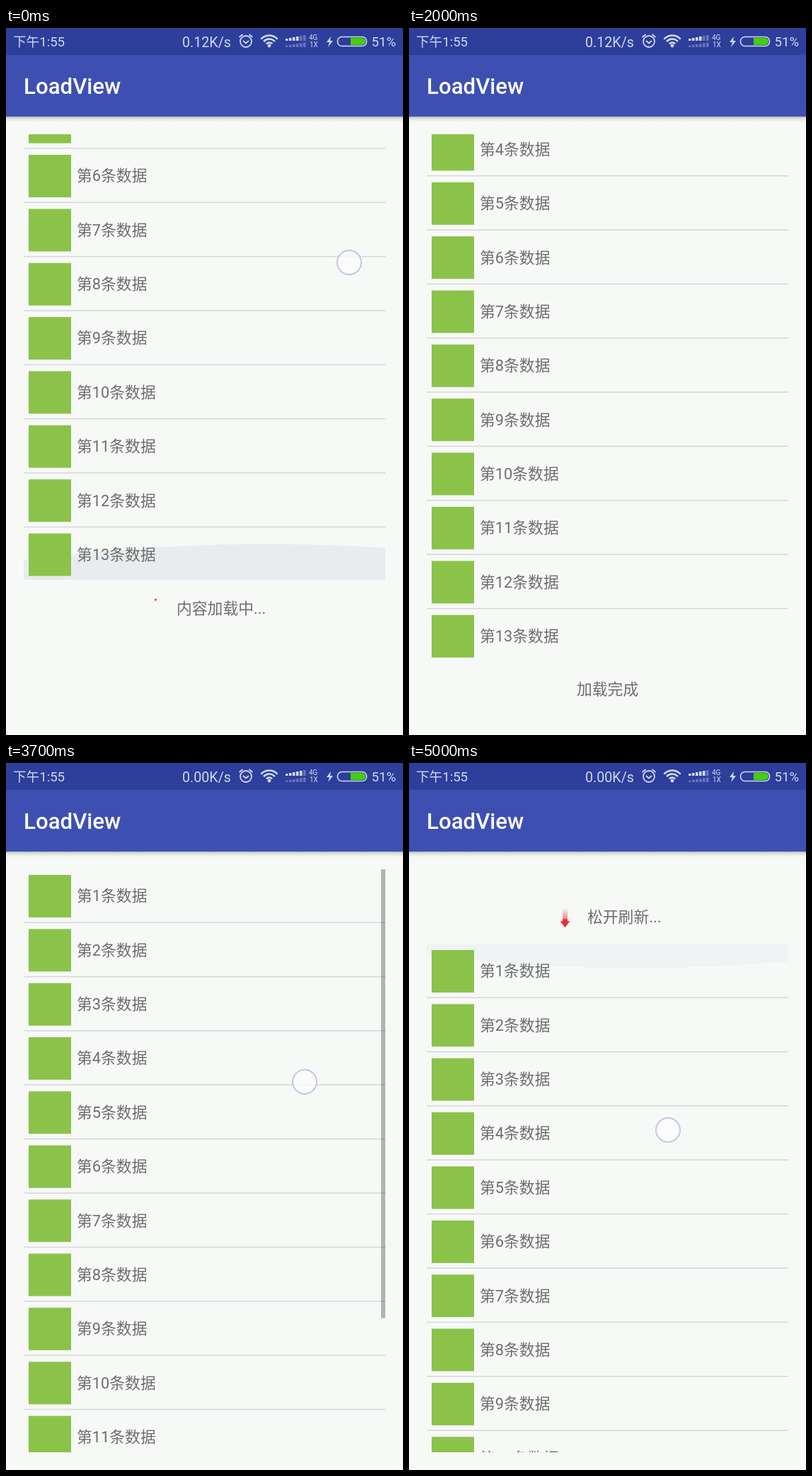
An HTML page with a canvas that plays this animation: 561 px wide and 998 px high, repeating every 5100 ms.

```html
<!DOCTYPE html>
<html lang="zh">
<head>
<meta charset="utf-8">
<title>LoadView</title>
<style>
html, body { margin: 0; width: 100%; height: 100%; overflow: hidden; background: #f7f9f7; }
canvas { display: block; }
</style>
</head>
<body>
<canvas id="stage" width="561" height="998"></canvas>
<script>
const ctx = document.getElementById('stage').getContext('2d');
const LOOP = 5100, STEP = 100;
const LEFT = 25, RIGHT = 536, TOP = 150, BOTTOM = 973, ROW = 76.36, BASELINE = 45.4;
const LOADED = 1700, ROW_ADDED = 2200;
const BG = '#f7f9f7', LIGHT = '#d3d8ee', DIM = '#6674bb', GREY = '#6d6e6d';

const clamp = v => Math.min(1, Math.max(0, v));
const easeOut = (v, power) => 1 - (1 - clamp(v)) ** power;

// Linear interpolation through [time, value] points
function track(t, points) {
  let [t0, v0] = points[0];
  for (const [t1, v1] of points) {
    if (t < t1) return v0 + (v1 - v0) * clamp((t - t0) / (t1 - t0));
    [t0, v0] = [t1, v1];
  }
  return v0;
}

// cubic-bezier(.4, 0, .2, 1)
function standardEase(x) {
  x = clamp(x);
  let lo = 0, hi = 1, s = 0.5;
  for (let i = 0; i < 20; i++) {
    s = (lo + hi) / 2;
    const bx = 1.2 * s * (1 - s) ** 2 + 0.6 * s * s * (1 - s) + s ** 3;
    if (bx < x) lo = s; else hi = s;
  }
  return s * s * (3 - 2 * s);
}

function rect(x, y, w, h, color) {
  ctx.fillStyle = color;
  ctx.fillRect(x, y, w, h);
}

function text(str, x, y, size, color, weight = 400, align = 'left') {
  ctx.font = `${weight} ${size}px Roboto, "Noto Sans CJK SC", "Noto Sans CJK", sans-serif`;
  ctx.textAlign = align;
  ctx.fillStyle = color;
  ctx.fillText(str, x, y);
}

function stroke(path, color, width) {
  ctx.strokeStyle = color;
  ctx.lineWidth = width;
  ctx.stroke(new Path2D(path));
}

function arc(x, y, r, from, to, color, width) {
  ctx.beginPath();
  ctx.arc(x, y, r, from, to);
  ctx.strokeStyle = color;
  ctx.lineWidth = width;
  ctx.stroke();
}

function statusBar(t) {
  rect(0, 0, 561, 38, '#2d3e9b');
  text('下午1:55', 10, 26, 18.6, LIGHT);
  text(t < 2400 ? '0.12K/s' : '0.00K/s', 318, 27, 19.7, LIGHT, 400, 'right');
  text('51%', 551, 26, 18.6, LIGHT, 400, 'right');

  arc(339, 19, 8, 0, 7, LIGHT, 1.8);
  stroke('M329.5 13l5-4M348.5 13l-5-4M335 18l4 3.5 4-3.5', LIGHT, 1.8);

  for (const r of [5.5, 10.5, 15.5]) arc(372, 26, r, -Math.PI * 0.77, -Math.PI * 0.23, LIGHT, 2.6);
  ctx.beginPath();
  ctx.arc(372, 25, 2.4, 0, 7);
  ctx.fillStyle = LIGHT;
  ctx.fill();

  const lit = t < 2400 ? 4 : 5;
  for (let i = 0; i < 6; i++) {
    const h = 3 + i;
    rect(395 + i * 5, 18 - h, 3.6, h, i < lit ? LIGHT : DIM);
    rect(395 + i * 5, 27 - h * 0.8, 3.6, h * 0.8, DIM);
  }
  text('4G', 428, 17, 10, LIGHT);
  text('1X', 429, 27, 10, LIGHT);

  ctx.fillStyle = LIGHT;
  ctx.fill(new Path2D('M459 12l-6 8h4l-2 7 7-9h-4z'));
  ctx.beginPath();
  ctx.roundRect(468.5, 12.5, 41, 13, 6);
  ctx.strokeStyle = LIGHT;
  ctx.lineWidth = 1.6;
  ctx.stroke();
  ctx.beginPath();
  ctx.roundRect(487, 14, 21, 10, [0, 5, 5, 0]);
  ctx.fillStyle = '#43cf0b';
  ctx.fill();
}

function appBar() {
  const shadow = ctx.createLinearGradient(0, 125, 0, 133);
  shadow.addColorStop(0, 'rgba(0,0,0,.25)');
  shadow.addColorStop(0.4, 'rgba(0,0,0,.09)');
  shadow.addColorStop(1, 'rgba(0,0,0,0)');
  rect(0, 125, 561, 8, shadow);
  rect(0, 38, 561, 87, '#3d50b2');
  text('LoadView', 25, 93.4, 31.2, '#fff', 500);
}

function row(label, y, divider) {
  rect(32, y + 8, 60, 60, '#8bc34a');
  text(label, 100, y + BASELINE, 21.8, GREY);
  if (divider) rect(LEFT, y + 74.5, RIGHT - LEFT, 1.5, '#d5d8d7');
}

// Ring whose arc grows, then shrinks, while it turns
function spinner(t, y) {
  const time = t + 30, phase = time % 1333 / 1333;
  const turn = time * (0.25 / 1333 + 2 / 6665) - 0.25;
  const tail = turn + 0.75 * standardEase(phase * 2 - 1);
  const head = turn + 0.75 * standardEase(phase * 2);
  arc(209, y, 12.3, tail * 2 * Math.PI, (head + 0.03) * 2 * Math.PI, '#e2366f', 2.7);
}

function footer(t, y) {
  if (t < LOADED) {
    spinner(t, y + 37.2);
    text('内容加载中...', 241, y + BASELINE, 21.8, GREY);
  } else {
    text('加载完成', 237, y + BASELINE - 1, 21.8, GREY);
  }
}

function header(offset) {
  const y = TOP + offset - ROW;
  for (let i = 0; i < 5; i++) rect(217, y + 27 + i * 3, 7, 2, `rgba(226,50,50,${0.15 + i * 0.17})`);
  rect(217, y + 41, 7, 4, '#e23232');
  ctx.fill(new Path2D(`M213.5 ${y + 43.5}h14l-7 9z`));
  text(offset < ROW ? '下拉刷新...' : '松开刷新...', 252, y + BASELINE, 21.8, GREY);
}

// Overscroll glow: depths at the left edge, control point and right edge
function glow(y, left, middle, right, alpha) {
  ctx.beginPath();
  ctx.moveTo(LEFT, y);
  ctx.lineTo(LEFT, y + left);
  ctx.quadraticCurveTo((LEFT + RIGHT) / 2, y + middle, RIGHT, y + right);
  ctx.lineTo(RIGHT, y);
  ctx.fillStyle = `rgba(70,80,140,${alpha})`;
  ctx.fill();
}

function scrollbar(t, offset) {
  const alpha = t < 2900 ? 0 : 0.28 * clamp((4100 - t) / 250);
  const scale = (BOTTOM - TOP) / (14 * ROW);
  rect(530, TOP - offset * scale, 6, (BOTTOM - TOP) * scale, `rgba(0,0,0,${alpha})`);
}

function touch(x, y) {
  ctx.beginPath();
  ctx.arc(x, y, 17, 0, 7);
  ctx.fillStyle = 'rgba(252,252,252,.8)';
  ctx.fill();
  arc(x, y, 17, 0, 7, '#c2c8e4', 2);
}

const pull = t => easeOut((t - 4200) / 800, 1.5);

function listOffset(t) {
  if (t < 2700) return -360.8 + 115.1 * easeOut(t / 600, 3);
  if (t < 4200) {
    return track(t, [[2700, -245.7], [2800, -244.4], [3100, -120], [3250, -72],
      [3400, -57.4], [3500, -48], [3700, 0]]);
  }
  return 106 * pull(t);
}

function drawTouch(t) {
  if (t < 100) touch(485, 331);
  else if (t >= 2700 && t < 3200) {
    touch(track(t, [[2800, 410], [3100, 400]]), track(t, [[2700, 389], [2800, 402], [3100, 527]]));
  } else if (t >= 3400 && t < 3800) {
    touch(track(t, [[3400, 430], [3700, 422]]), track(t, [[3400, 378], [3700, 450]]));
  } else if (t >= 4100) {
    touch(398 - 32 * pull(t), 369 + 149 * pull(t));
  }
}

function draw(t) {
  const offset = listOffset(t), count = t < ROW_ADDED ? 13 : 14;
  rect(0, 0, 561, 998, BG);

  ctx.save();
  ctx.beginPath();
  ctx.rect(LEFT, TOP, RIGHT - LEFT, BOTTOM - TOP);
  ctx.clip();
  if (offset > 0) {
    header(offset);
    glow(TOP + offset, 15, 47, 24, 0.035 * clamp(offset / 80));
  }
  if (t < 500) glow(TOP + offset + 13 * ROW - 3, -28, -61.5, -45, 0.08 * (1 - t / 500));
  for (let i = 0; i < count; i++) {
    row(i < 13 ? `第${i + 1}条数据` : '上拉增加的数据', TOP + offset + i * ROW, i < count - 1);
  }
  if (count === 13) footer(t, TOP + offset + 13 * ROW);
  scrollbar(t, offset);
  ctx.restore();

  statusBar(t);
  appBar();
  drawTouch(t);
}

function tick() {
  draw(Math.floor(performance.now() % LOOP / STEP) * STEP);
  requestAnimationFrame(tick);
}
tick();
</script>
</body>
</html>
```
